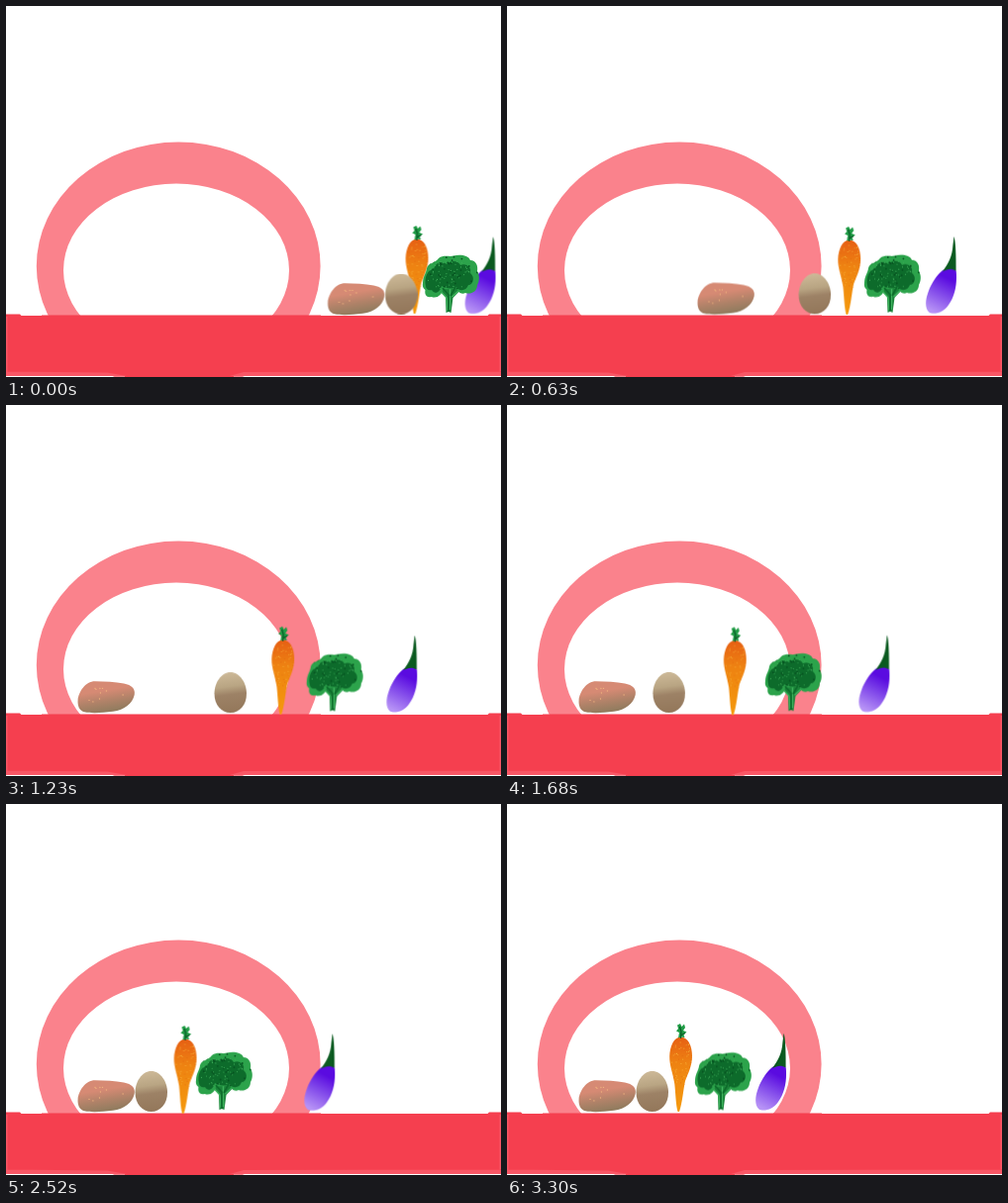
Recreate the animation shown at these times as an HTML page. Size 500 by 375 pixels, loop 4630 ms.

```html
<!DOCTYPE html>
<html lang="en">
<head>
<meta charset="utf-8">
<title>Vegetables</title>
<style>
  html, body { margin: 0; width: 100%; height: 100%; overflow: hidden; background: #fff; }
  svg { display: block; width: 500px; height: 375px; }
</style>
</head>
<body>
<svg viewBox="0 0 500 375" xmlns="http://www.w3.org/2000/svg">
  <defs>
    <linearGradient id="potatoFill" x1=".35" y1="0" x2=".65" y2="1">
      <stop offset=".3" stop-color="#d68a74"/>
      <stop offset=".62" stop-color="#b08268"/>
      <stop offset="1" stop-color="#897a5c"/>
    </linearGradient>
    <linearGradient id="eggFill" x1=".45" y1="0" x2=".55" y2="1">
      <stop offset="0" stop-color="#cdb998"/>
      <stop offset=".35" stop-color="#b9a583"/>
      <stop offset=".55" stop-color="#9d8266"/>
      <stop offset="1" stop-color="#93775a"/>
    </linearGradient>
    <linearGradient id="carrotFill" x1="0" y1="0" x2="0" y2="1">
      <stop offset="0" stop-color="#e65f14"/>
      <stop offset=".35" stop-color="#ee8212"/>
      <stop offset="1" stop-color="#f59a0c"/>
    </linearGradient>
    <linearGradient id="plumFill" x1=".7" y1="0" x2=".35" y2="1">
      <stop offset=".2" stop-color="#5a0be0"/>
      <stop offset=".55" stop-color="#8148ea"/>
      <stop offset="1" stop-color="#b793f6"/>
    </linearGradient>
    <clipPath id="potatoClip"><use href="#potatoBody"/></clipPath>
    <clipPath id="carrotClip"><use href="#carrotBody"/></clipPath>
    <clipPath id="crownClip"><use href="#crown"/></clipPath>
  </defs>

  <path fill="#fa828c" fill-rule="evenodd" d="M30.8 263a143.4 125.5 0 0 1 286.8 0a143.4 125.5 0 0 1-286.8 0z
    M58 267a114 87.5 0 0 0 228 0a114 87.5 0 0 0-228 0z"/>
  <rect y="313" width="500" height="61" fill="#f53f4f"/>
  <path fill="#f53f4f" d="M36 312.5H318V313H36zM120 374H230V375H120z"/>
  <path fill="#f53f4f" d="M0 311.6h14l1.5 1.4H0zM500 311.6h-12l-1.5 1.4h13.5z"/>
  <path fill="#f95766" d="M0 369.5L102 370.5L122 374H0zM500 369.5L240 370L226 374H500zM0 314h1.5v56H0zM498.5 314h1.5v56h-1.5z"/>

  <g id="aubergine">
    <path fill="url(#plumFill)" d="M268 266C273 262 281 263 281.8 267C282.8 280 280.5 292 274 301C269 309 259 311.2 254.5 308.5
      C250 304.5 250.5 296 253.5 288C257 278 263 270 268 266z"/>
    <path fill="#0b5a20" d="M279.5 231.8C281.3 236 281.7 252 281.6 266.5C277 263.5 273 264.5 268 267C273.5 260 277.8 252 278.4 241z"/>
  </g>

  <g id="carrot">
    <path id="carrotBody" fill="url(#carrotFill)" d="M175.5 235.5C183 235.5 187 245 187 254.5C187 265 183 272 180 280C178 289 177 303 174 311H172.5
      C170.5 304 170.3 292 169.3 283C167.3 271 164 264 164.2 255C164.6 245 168.5 235.5 175.5 235.5z"/>
    <g id="carrotDots" clip-path="url(#carrotClip)"/>
    <path fill="#1f9c45" d="M173 236.5L174 231L171 229.5L173 227L172 223.5L175 222L176.5 225L179 222.5L180 226L178 229L181.5 230.5L178.5 233L179.5 236L176 235.5z"/>
    <path fill="none" stroke="#0b5a28" stroke-width="1.2" d="M175.5 237L176 230L174.5 225M176 233.5L180 231.5"/>
  </g>

  <g id="broccoli">
    <path fill="#1b8339" d="M204 284L213 293L213.5 309L216 308L218.5 309L220.5 294L230 284L222 280H210z"/>
    <path fill="none" stroke="#3fb45e" stroke-width="1.4" d="M207 286L214 294L215 307M217.5 285V306M226 287L219.5 293"/>
    <path id="crown" fill="#2ca34b" d="M190 279C190 272 194 268 194 264C196 258 203 259 206 254C211 250 217 253 221 251.5C228 250 236 251 238 256
      C244 256 246 262 245 267C248 272 247 278 245 281C245 288 238 291 233 289C229 291 225 288 224 284C219 286 214 285 210 285
      C210 291 204 295 199 293C192 294 192 289 192.5 286C190 284 189.5 282 190 279z"/>
    <g clip-path="url(#crownClip)">
      <path fill="#0d6b2b" d="M193 282C191 274 195 265 201 265C203 257 211 257 214 260C219 255 226 257 228 261C234 258 240 264 238 269
        C243 273 241 281 236 281C234 287 227 288 224 283C219 286 212 284 209 282C207 289 202 291 199 286C196 287 193 285 193 282z"/>
      <g id="darkDots"/>
      <g id="leafDots"/>
    </g>
    <path fill="none" stroke="#0d6b2b" stroke-width="1.6" d="M210 284L216 291V308M223 283L218 292"/>
  </g>

  <g id="egg">
    <path fill="url(#eggFill)" d="M146.7 270C156 270 163 280.5 163 291.5C163 303 156 311 146.7 311C137.5 311 130.5 303 130.5 291.5C130.5 280.5 137.5 270 146.7 270z"/>
  </g>

  <g id="potato">
    <path id="potatoBody" fill="url(#potatoFill)" d="M72.6 298C73.5 290 80 279.2 90 279.2C100 279.4 110 279.8 119 281.5C127 283 131 287 129.7 293
      C127.5 302 120 308 108 309.8C97 311.3 84 311.8 78 310C73.5 308 72.2 303 72.6 298z"/>
    <g id="potatoDots" clip-path="url(#potatoClip)"/>
  </g>
</svg>

<script>
const LOOP = 4630, STEP = 30;
const $ = id => document.getElementById(id);

let seed = 7;
const rand = () => (seed = seed * 16807 % 2147483647) / 2147483647;

// Scatter small dots inside an ellipse.
function speckle(id, count, cx, cy, rx, ry, size, color) {
  let d = '';
  for (let i = 0; i < count; i++) {
    const a = rand() * Math.PI * 2, r = Math.sqrt(rand());
    const x = cx + rx * r * Math.cos(a), y = cy + ry * r * Math.sin(a);
    d += `M${x.toFixed(1)} ${y.toFixed(1)}h.01`;
  }
  const path = document.createElementNS('http://www.w3.org/2000/svg', 'path');
  path.setAttribute('d', d);
  path.setAttribute('style', `fill:none;stroke:${color};stroke-width:${size};stroke-linecap:round`);
  $(id).append(path);
}

speckle('potatoDots', 10, 97, 293, 22, 9, 1.3, '#efb27e');
speckle('carrotDots', 45, 175.5, 262, 11, 30, 0.9, '#f8b53a');
speckle('carrotDots', 25, 175.5, 258, 11, 28, 0.9, '#e2690f');
speckle('darkDots', 30, 218, 270, 27, 18, 1.8, '#075321');
speckle('leafDots', 60, 216, 271, 24, 15, 1.1, '#3fae5b');

// Offsets from the resting place: [time, dx, dy]
const moves = {
  potato: [[0, 252.5, 1], [1200, 0, 0]],
  egg: [[0, 252.5, 0.5], [1800, 0, 0]],
  carrot: [[0, 239.5, 0], [2100, 8.5, 3], [3300, 0, 0]],
  broccoli: [[0, 231, 1], [2400, 2.2, 0], [3300, 0, 0.5]],
  aubergine: [[0, 212.5, 1.5], [3300, 0, 0]]
};

for (const [id, stops] of Object.entries(moves)) {
  const frames = stops.map(([t, x, y], i) => {
    const next = stops[i + 1];
    return {
      offset: t / LOOP,
      transform: `translate(${x}px, ${y}px)`,
      easing: next ? `steps(${(next[0] - t) / STEP}, end)` : 'linear'
    };
  });
  frames.push({ ...frames[frames.length - 1], offset: 1 });
  $(id).animate(frames, { duration: LOOP, iterations: Infinity });
}
</script>
</body>
</html>
```
